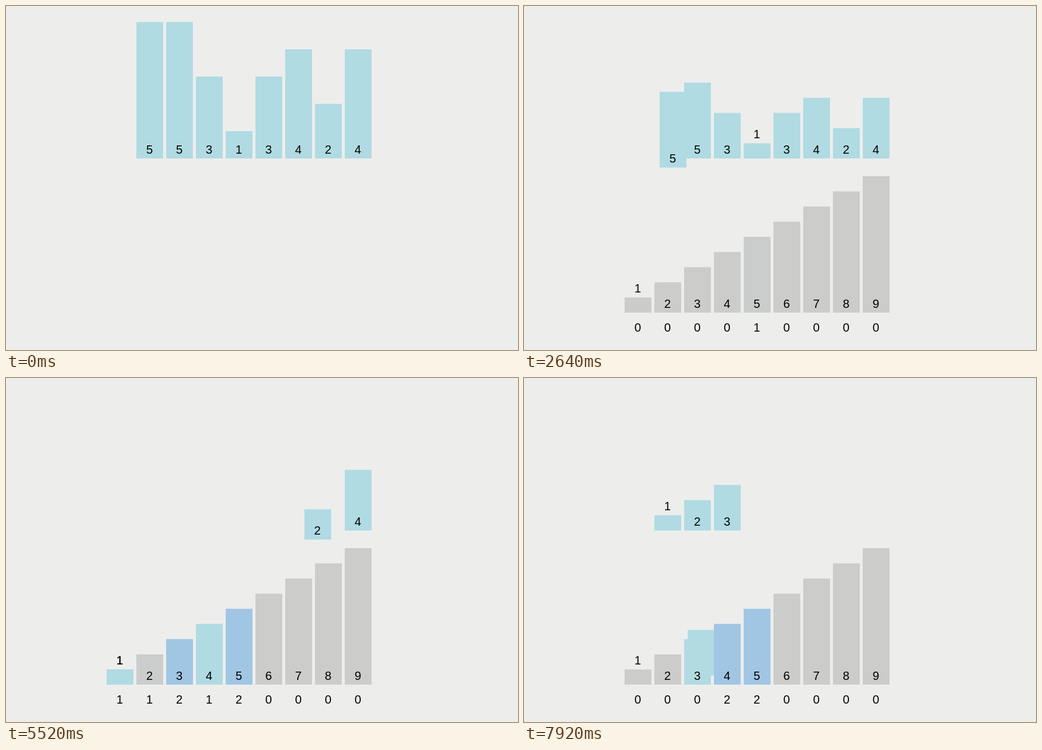
An HTML page with a canvas for the animation above (8 s loop, 860 by 580 pixels).

```html
<!DOCTYPE html>
<html lang="en">
<head>
<meta charset="utf-8">
<title>Counting sort</title>
<style>
  html, body { margin: 0; width: 100%; height: 100%; overflow: hidden; background: #ededec; }
  canvas { display: block; }
</style>
</head>
<body>
<canvas id="stage" width="860" height="580"></canvas>
<script>
const ctx = document.getElementById('stage').getContext('2d');
const LOOP = 8000, SETUP = 1834, SETUP_TIME = 800;
const FIRST_MOVE = 2581, STEP = 480, MOVE_TIME = 240;
const GAP = 50, BAR = 45, TOP_BASE = 257, LOW_BASE = 517, FULL = 230;
const INPUT = [5, 5, 3, 1, 3, 4, 2, 4];
const SORTED = [...INPUT].sort((a, b) => a - b);
const BLACK = [0, 0, 0];
const LEVELS = [[204, 204, 203], [176, 219, 226], [161, 198, 228]]; // by count
const UNIT = FULL / 9;

const mix = (a, b, k) => a + (b - a) * k;
const mixColor = (a, b, k) => `rgb(${a.map((v, i) => Math.round(mix(v, b[i], k)))})`;
const slotX = v => 119 + GAP * v;
const cellX = i => 219 + GAP * i;

function ease(t) {
  t = Math.min(1, Math.max(0, t));
  return t < 0.5 ? 4 * t ** 3 : 1 - 4 * (1 - t) ** 3;
}

// Steps 0-7 drop the input into the slots, steps 8+ take it out in order.
const moveStart = n => FIRST_MOVE + STEP * n;
const moved = (n, time) => ease((time - moveStart(n)) / MOVE_TIME);
const steps = [...INPUT.map(value => ({ value, add: 1 })),
               ...SORTED.map(value => ({ value, add: -1 }))];

// Each input block leaves its slot in the step of its rank.
const blocks = INPUT.map((value, i) => {
  const earlier = INPUT.slice(0, i).filter(v => v === value).length;
  return { value, i, rank: SORTED.indexOf(value) + earlier };
});

function label(text, x, y) {
  ctx.fillStyle = '#000';
  ctx.fillText(text, x + 22, y);
}

// Short bars carry their label above them.
const labelY = (value, base) => (value === 1 ? base - UNIT : base) - 8;

function drawBlock({ value, i, rank }, time) {
  const setup = ease((time - SETUP) / SETUP_TIME);
  const down = moved(i, time), up = moved(INPUT.length + rank, time);
  const x = mix(mix(cellX(i), slotX(value), down), cellX(rank), up);
  const base = mix(TOP_BASE, LOW_BASE, down - up);
  const height = value * mix(FULL / 5, UNIT, setup);
  ctx.fillStyle = mixColor(LEVELS[1], LEVELS[1], 0);
  ctx.fillRect(x, base - height, BAR, height);
  label(value, x, mix(base - 8, labelY(value, base), setup));
}

function drawSlot(value, time) {
  const setup = ease((time - SETUP) / SETUP_TIME);
  let count = 0, before = 0, k = 1;
  steps.forEach((s, n) => {
    if (s.value !== value || time < moveStart(n)) return;
    before = count;
    count += s.add;
    k = moved(n, time);
  });
  const x = slotX(value), height = value * UNIT;
  ctx.fillStyle = setup < 1 && !count
    ? mixColor(BLACK, LEVELS[0], setup)
    : mixColor(LEVELS[before], LEVELS[count], k);
  ctx.fillRect(x, LOW_BASE - height, BAR * setup, height * setup);
  label(value, x, labelY(value, LOW_BASE));
  label(count, x, 549);
}

function draw(time) {
  ctx.fillStyle = '#ededec';
  ctx.fillRect(0, 0, 860, 580);
  ctx.font = '20px "Liberation Sans", Arial, sans-serif';
  ctx.textAlign = 'center';
  blocks.forEach(b => drawBlock(b, time));
  if (time >= SETUP) for (let v = 1; v <= 9; v++) drawSlot(v, time);
}

let origin;
function frame(now) {
  origin ??= now;
  draw((now - origin) % LOOP);
  requestAnimationFrame(frame);
}
draw(0);
requestAnimationFrame(frame);
</script>
</body>
</html>
```
